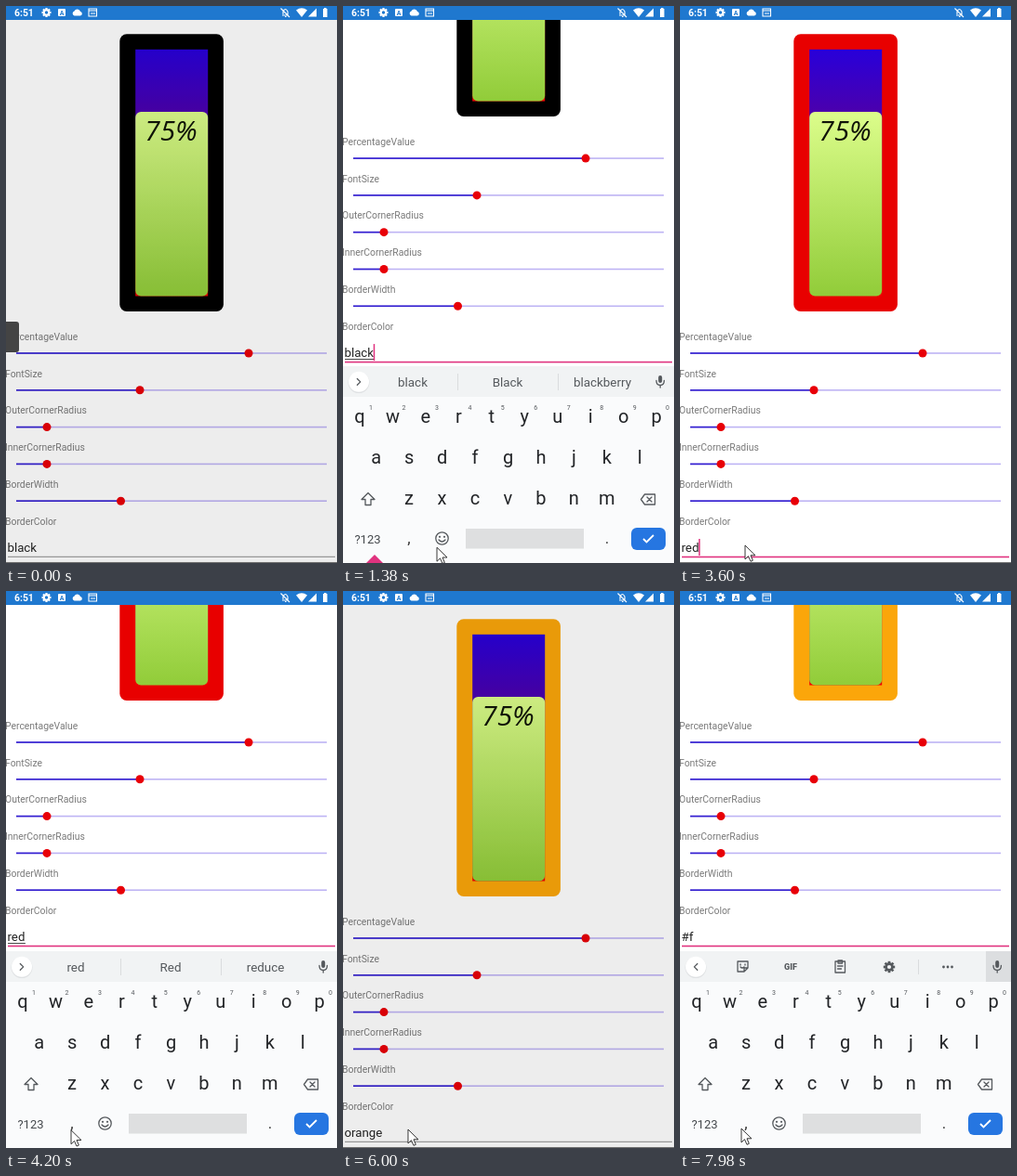
Recreate the animation shown at these times as an HTML page. Size 356 px wide and 600 px high, loop 8000 ms.

```html
<!DOCTYPE html>
<html lang="en">
<head>
<meta charset="utf-8">
<title>Gauge settings</title>
<style>
html, body { margin: 0; width: 100%; height: 100%; overflow: hidden; background: #000; }
svg { display: block; width: 100vw; height: 100vh; font-family: Roboto, sans-serif; }
.mid { text-anchor: middle; }
.line { fill: none; stroke: #55595d; stroke-width: 1.3; stroke-linejoin: round; stroke-linecap: round; }
</style>
</head>
<body>
<svg id="stage" viewBox="0 0 356 600"></svg>
<script>
const LOOP = 8000, SCROLL = 211, PINK = '#e0337f';

// Each edit: tap, keyboard opens, input loses focus, keyboard hides, page returns.
const sessions = [
  { tap: 960, open: 1050, blur: 2340, hide: 2400, reset: 2580, handle: 34 },
  { tap: 3500, open: 3720, blur: 5310, hide: 5400, reset: 5520, handle: 21 },
  { tap: 6310, open: 6417, blur: 9000, hide: 9000, reset: 9000, handle: 42 }
];
const borders = [[0, '#000'], [2580, '#e80000'], [5520, '#fba60a']];
const pointer = [[0, -14, 420], [250, -14, 420], [800, 101, 583], [2700, 101, 584],
  [3300, 70, 581], [6000, 70, 580], [6250, 66, 579], [LOOP, 66, 579]];

const edits = [[0, 'black']];
function erase(start, step) {
  let word = edits[edits.length - 1][1];
  for (let t = start; word; t += step) edits.push([t, word = word.slice(0, -1)]);
}
function type(word, start, step) {
  for (let i = 1; i <= word.length; i++) edits.push([start + (i - 1) * step, word.slice(0, i)]);
}
erase(1500, 70);
type('red', 1950, 120);
erase(4270, 70);
type('orange', 4560, 135);
erase(6860, 90);
type('#f', 7650, 200);

const at = (list, t) => list.filter(e => e[0] <= t).pop()[1];
const clamp = x => Math.max(0, Math.min(1, x));
const easeOut = x => 1 - (1 - clamp(x)) ** 3;

function along(points, t) {
  const i = Math.max(1, points.findIndex(p => p[0] > t));
  const [a, b] = [points[i - 1], points[i]];
  const p = clamp((t - a[0]) / (b[0] - a[0])), k = p * p * (3 - 2 * p);
  return [a[1] + (b[1] - a[1]) * k, a[2] + (b[2] - a[2]) * k];
}

const text = (x, y, size, fill, s, more = '') =>
  `<text x="${x}" y="${y}" font-size="${size}" fill="${fill}" ${more}>${s}</text>`;
const mid = (x, y, size, fill, s, more = '') => text(x, y, size, fill, s, 'class="mid" ' + more);
const rect = (x, y, w, h, fill, more = '') =>
  `<rect x="${x}" y="${y}" width="${w}" height="${h}" fill="${fill}" ${more}/>`;
const circle = (x, y, r, fill, more = '') => `<circle cx="${x}" cy="${y}" r="${r}" fill="${fill}" ${more}/>`;
const path = (d, more = 'class="line"') => `<path d="${d}" ${more}/>`;
const gear = (x, y, r, fill, hole) =>
  `<g transform="translate(${x} ${y})">` +
  [0, 45, 90, 135].map(a => rect(-r * .22, -r, r * .44, r * 2, fill, `transform="rotate(${a})"`)).join('') +
  circle(0, 0, r * .76, fill) + circle(0, 0, r * .34, hole) + '</g>';

function slider(name, i, x) {
  const y = 374 + i * 39.8;
  return text(-1, y - 14.2, 10.4, '#7a7a7a', name) +
    rect(11, y - .8, 334, 1.6, '#beb4f4') +
    rect(11, y - .8, x - 11, 1.6, '#3420d0') + circle(x, y, 4.5, '#e80008');
}

const gauge =
  '<rect id="border" x="122.3" y="30.3" width="111.6" height="298.6" rx="7.5"/>' +
  rect(139.2, 46.8, 78, 265.7, 'url(#heat)') +
  rect(139.2, 114, 78, 198.5, 'url(#lime)', 'rx="6"') +
  mid(177.5, 145.2, 29.8, '#101408', '75%', 'font-family="Open Sans, sans-serif" font-style="italic" font-weight="500"');

const sliders = [['PercentageValue', 261], ['FontSize', 144], ['OuterCornerRadius', 44],
  ['InnerCornerRadius', 44], ['BorderWidth', 123.5]].map(([n, x], i) => slider(n, i, x)).join('');

const page = `<g id="page">
  ${rect(0, 0, 356, 600, '#fff')}${gauge}${sliders}
  ${text(-1, 558.8, 10.4, '#7a7a7a', 'BorderColor')}
  <text id="entry" x="1.5" y="588" font-size="13.25" fill="#222"></text>
  <rect id="compose" x="2" y="590" height=".9" fill="#333"/>
  <rect id="caret" y="574" width="1.5" height="18" fill="${PINK}"/>
  <rect id="rule" x="2" width="352"/>
  ${rect(0, 599, 356, 1, '#777')}
  ${rect(0, 0, 356, 600, '#000', 'id="shade" opacity=".07"')}</g>`;

function keyboard() {
  let s = rect(0, 388, 356, 212, '#fafbfc') + rect(0, 388, 356, 33, '#f1f3f4') +
    rect(329, 388, 27, 33, '#dcdee0', 'id="micBack"');
  s += circle(17, 405.6, 11.5, '#dfe1e3') + circle(17, 404.8, 11, '#fff');
  s += `<g id="words">${path('M15.3 401.5l3.4 3.4-3.4 3.4')}
    ${rect(123, 396, 1, 18, '#dadcde')}${rect(231, 396, 1, 18, '#dadcde')}
    ${[75, 177, 279].map((x, i) => mid(x, 409.5, 13.4, '#54585c', '', `id="word${i}"`)).join('')}
    <g id="fruit">${circle(177, 406, 6, '#f79a20')}${circle(175, 404, 2.5, '#ffc163')}
    ${path('M176 400q2-4 6-1q-2 3-6 1', 'fill="#5a9b38"')}</g></g>`;
  s += `<g id="tools">${path('M18.7 401.5l-3.4 3.4 3.4 3.4')}
    ${path('M62 399h11v7l-4 4h-7zM73 406h-4v4M65 402v1M70 402v1M65 405q2 2 4 0')}
    ${mid(119, 408, 9, '#55595d', 'GIF', 'font-weight="900"')}
    ${path('M167 399h10.500v12h-10.500zM170 398h4.500v3h-4.500zM169.500 404h5.500M169.500 407h4')}
    ${gear(225, 405, 6.2, '#55595d', '#f1f3f4')}${rect(256, 397, 1, 16, '#dadcde')}
    ${[283.5, 288, 292.5].map(x => circle(x, 405, 1.4, '#55595d')).join('')}</g>`;
  s += rect(339.2, 398, 4, 8, '#55595d', 'rx="2"') + path('M337 403.500q0 5 4.200 5t4.200-5M341.200 408.500v2.500');

  [['qwertyuiop', 18, 449], ['asdfghjkl', 35.7, 493], ['zxcvbnm', 71, 537]].forEach(([row, x0, y]) =>
    [...row].forEach((c, i) => {
      const x = x0 + i * 35.45;
      s += mid(x, y, 20, '#222427', c);
      if (y === 449) s += mid(x + 12, 434.5, 7, '#55595d', (i + 1) % 10);
    }));

  s += path('M27 524.500l-7 7h4v6h6v-6h4z');
  s += path('M324.500 526h11v11h-11l-4-5.500zM327 529l5 5M332 529l-5 5');
  s += mid(26.5, 578.5, 13, '#44484c', '?123') + mid(71, 579, 17, '#333', ',') + mid(284, 579, 17, '#333', '.');
  s += circle(106.5, 573.5, 6.7, 'none', 'class="line"') + path('M103 575q3.500 4 7 0') +
    circle(104, 571.8, 1.1, '#55595d') + circle(109, 571.8, 1.1, '#55595d');
  s += rect(132, 563, 127, 21.5, '#dedfe0') + rect(310, 562, 37, 24, '#2676e1', 'rx="6"') +
    path('M323 574l3.500 3.500 7.500-7.500', 'fill="none" stroke="#fff" stroke-width="1.8"');
  return `<g id="keys">${s}</g>`;
}

const BLUE = '#1f78cf', white = 'fill="#fff"', thin = 'fill="none" stroke="#fff" stroke-width="1.1"';
const statusBar = rect(0, 0, 356, 15, BLUE) +
  text(9, 10.8, 10.4, '#fff', '6:51', 'font-weight="700"') +
  gear(43.5, 7, 5, '#fff', BLUE) +
  rect(56, 3, 8, 8, '#fff', 'rx="1"') + mid(60, 9.5, 7, BLUE, 'A', 'font-weight="700"') +
  path('M73.500 10.500a2.600 2.600 0 0 1 0-5a3.500 3.500 0 0 1 6.500.5a2.300 2.300 0 0 1 0 4.500z', white) +
  path('M89 3h8.500v8h-8.500zM89 5h8.500M91 8h5', thin) +
  path('M297 10h7M298 9v-3q2.500-5 5 0v3M300 11.500h1.500M295.500 2.500l9.500 9.500', thin) +
  path('M312 4.500q6-4.500 12 0l-6 7.500z', white) + path('M334 2.500v9h-9z', white) +
  path('M341 3h1v-1h2.500v1h1v9h-4.500z', white);

const stage = document.getElementById('stage');
stage.innerHTML = `<defs>
  <linearGradient id="heat" x2="0" y2="1"><stop stop-color="#2800da"/><stop offset=".25" stop-color="#4a00ae"/>
    <stop offset="1" stop-color="#f00000"/></linearGradient>
  <linearGradient id="lime" x2="0" y2="1"><stop stop-color="#dcfd8b"/><stop offset="1" stop-color="#91cc39"/></linearGradient>
  </defs>${rect(0, 0, 356, 600, '#000')}${page}
  ${rect(-4, 340, 18, 33, '#444', 'rx="3" id="tab"')}${keyboard()}
  <path id="handle" d="M0 591l9 9h-18z" fill="${PINK}"/>${statusBar}
  <path id="arrow" d="M0 0V15L3.500 11.700L6 17.300L8.300 16.300L6 10.800H11Z" fill="#fff" stroke="#222" stroke-width=".9"/>`;

const el = {};
stage.querySelectorAll('[id]').forEach(n => el[n.id] = n);
const set = (id, attrs) => { for (const k in attrs) el[id].setAttribute(k, attrs[k]); };
const show = (id, on) => { el[id].style.display = on ? '' : 'none'; };
const write = (id, s) => { if (el[id].textContent !== s) el[id].textContent = s; };
const move = (id, x, y) => set(id, { transform: `translate(${x} ${y})` });

const longer = { black: 'blackberry', red: 'reduce' };
function suggest(word, late) {
  const cap = word.charAt(0).toUpperCase() + word.slice(1);
  if (word === 'orang') return [word, 'orange', 'orangeburg'];
  if (word === 'orange') return late ? [word, '', cap] : ['orang', word, 'orangeburg'];
  return [word, cap, longer[word] || word + 's'];
}

function render(t) {
  const s = sessions.find(x => t >= x.tap && t < x.reset);
  const focused = !!s && t < s.blur;
  const open = !!s && t >= s.open;
  const keysUp = open && t < s.hide;
  const word = at(edits, t), late = t > 6000;
  const letters = /^[a-z]/.test(word);

  move('page', 0, open ? -SCROLL * easeOut((t - s.open) / 400) : 0);
  show('shade', !focused);
  set('border', { fill: at(borders, t) });
  set('rule', focused ? { y: 592.7, height: 1.6, fill: PINK } : { y: 592.8, height: 1, fill: '#8c8c8c' });
  write('entry', word);
  const width = word ? el.entry.getComputedTextLength() : 0;
  set('compose', { width });
  show('compose', focused && keysUp && letters);
  set('caret', { x: 1.2 + width });
  show('caret', focused && (t - s.tap) % 1000 < 500);

  show('keys', keysUp);
  show('handle', keysUp && t < s.open + 420);
  if (keysUp) {
    move('keys', 0, 212 * (1 - easeOut((t - s.open) / 200)));
    move('handle', s.handle, 0);
    const hint = at(edits, t - 150), typed = /^[a-z]/.test(hint) && letters;
    show('words', typed);
    show('tools', !typed);
    show('micBack', late);
    show('fruit', late && hint === 'orange');
    suggest(hint, late).forEach((w, i) => write('word' + i, w));
  }
  show('tab', t < 250);
  move('arrow', ...along(pointer, t));
}

const start = performance.now();
function tick() {
  render((performance.now() - start) % LOOP);
  requestAnimationFrame(tick);
}
tick();
</script>
</body>
</html>
```
